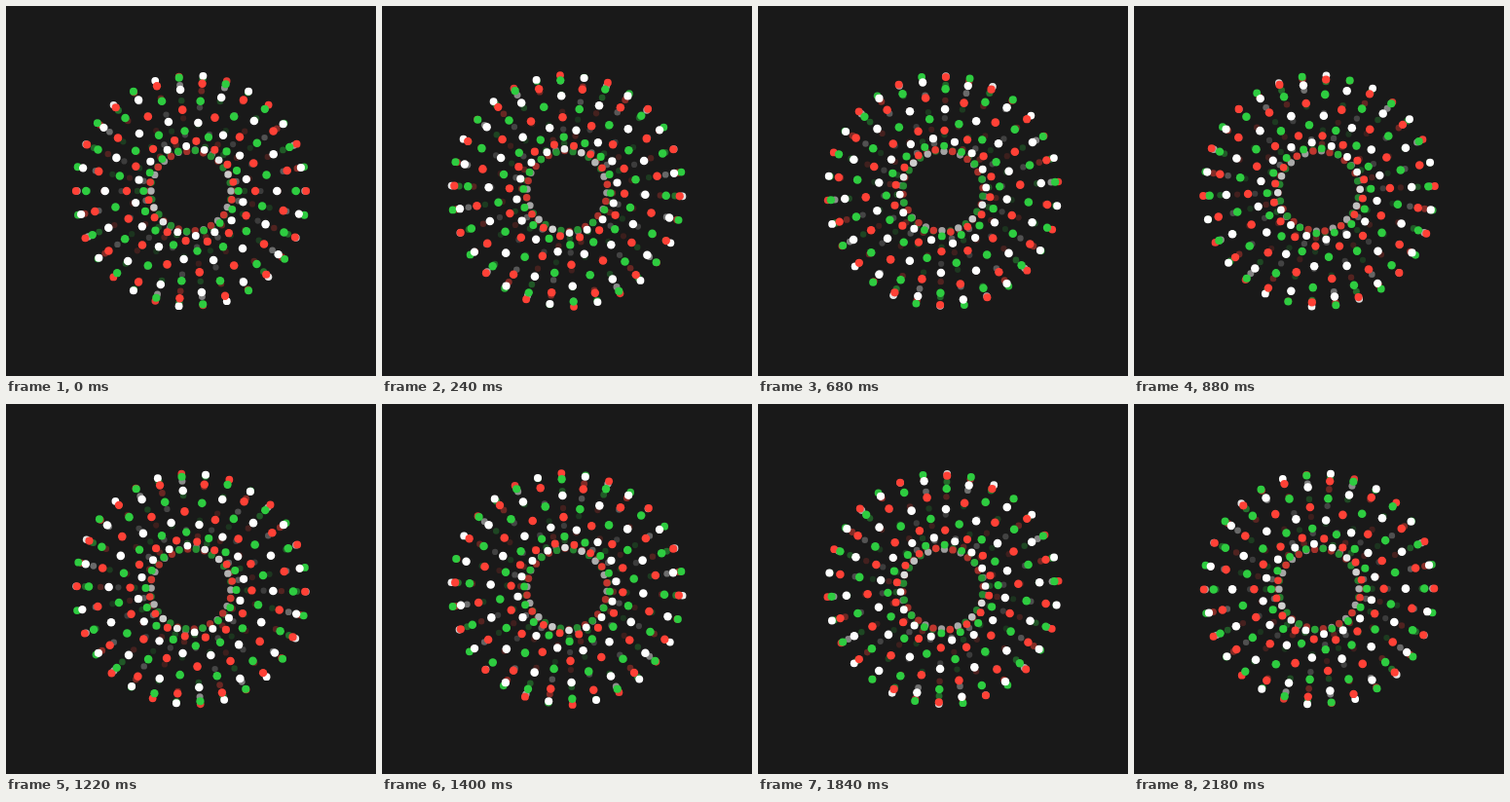
Recreate the animation shown at these times as an HTML page with a canvas. Size 380x380 px, loop 2.2 s.

```html
<!DOCTYPE html>
<html lang="en">
<head>
<meta charset="utf-8">
<title>Torus of dots</title>
<style>
  html, body { margin: 0; width: 100%; height: 100%; overflow: hidden; background: #191919; }
  canvas { display: block; width: 380px; height: 380px; }
</style>
</head>
<body>
<canvas id="stage"></canvas>
<script>
const SIZE = 380, PERIOD = 1100, STEP = 20;
const RING = 79, TUBE = 38, CAMERA = 360;
const STRANDS = 12, DOTS = 30, TWIST = 4;
const BACK = [25, 25, 25];
const COLORS = [[255, 255, 255], [255, 65, 54], [46, 204, 64]];
const RAD = Math.PI / 180;

const canvas = document.getElementById('stage');
const ratio = window.devicePixelRatio || 1;
canvas.width = canvas.height = SIZE * ratio;
const ctx = canvas.getContext('2d');
ctx.scale(ratio, ratio);

// Dots fade into the background with depth (-1 far, 1 near).
function shade(color, depth) {
  const light = Math.min(1, 0.65 + depth * (depth > 0 ? 1.2 : 0.5));
  const mix = color.map((c, i) => Math.round(BACK[i] + (c - BACK[i]) * light));
  return `rgb(${mix.join(',')})`;
}

function makeDot(strand, index, progress) {
  const around = (index + progress) * 360 / DOTS;
  const tube = (TWIST * around + strand * 360 / STRANDS) * RAD;
  const depth = Math.sin(tube);
  const zoom = CAMERA / (CAMERA - TUBE * depth);
  const dist = (RING + TUBE * Math.cos(tube)) * zoom;
  return {
    x: SIZE / 2 + dist * Math.cos(around * RAD),
    y: SIZE / 2 + dist * Math.sin(around * RAD),
    depth,
    radius: 3.7 + 0.6 * depth,
    color: COLORS[strand % COLORS.length]
  };
}

function draw(time) {
  const progress = Math.floor(time % PERIOD / STEP) * STEP / PERIOD;
  const dots = [];
  for (let s = 0; s < STRANDS; s++) {
    for (let i = 0; i < DOTS; i++) dots.push(makeDot(s, i, progress));
  }
  dots.sort((a, b) => a.depth - b.depth);

  ctx.fillStyle = `rgb(${BACK.join(',')})`;
  ctx.fillRect(0, 0, SIZE, SIZE);
  for (const d of dots) {
    ctx.fillStyle = shade(d.color, d.depth);
    ctx.beginPath();
    ctx.arc(d.x, d.y, d.radius, 0, 2 * Math.PI);
    ctx.fill();
  }
}

const start = performance.now();
function tick() {
  draw(performance.now() - start);
  requestAnimationFrame(tick);
}
tick();
</script>
</body>
</html>
```
